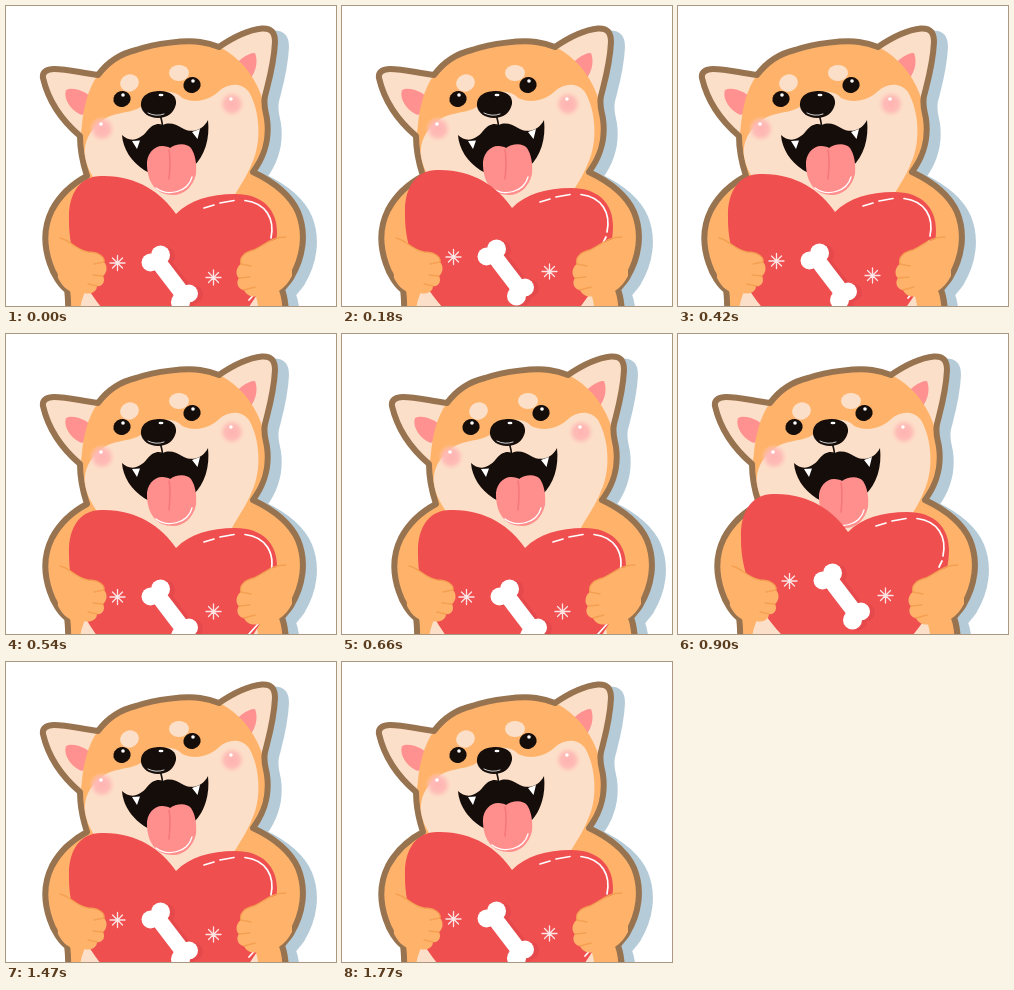
Animation, 330 px wide and 300 px high, one loop 1.8 s. Source, as an HTML page:

```html
<!DOCTYPE html>
<html lang="en">
<head>
<meta charset="utf-8">
<title>Puppy with a heart</title>
<style>
  html, body { margin: 0; width: 100%; height: 100%; overflow: hidden; background: #fff; }
  svg { display: block; width: 330px; height: 300px; }
  .ink { fill: #150d0a; }
  .cream { fill: #fcdfc8; }
  .pink { fill: #ff9290; }
  .fur { fill: #ffb36a; }
  .white { fill: #fff; }
  .line { fill: none; stroke-linecap: round; stroke-linejoin: round; }
  .crease { stroke: #f4a052; stroke-width: 1.3; }
</style>
</head>
<body>
<svg viewBox="0 0 330 300" xmlns="http://www.w3.org/2000/svg">
  <defs>
    <path id="silhouette" d="M37 72 C36 66 41 63 48 63 C62 63 75 67 92 69
      C104 53 117 47 130 44 C150 37 180 34 194 36 C202 37 208 39 213 41
      C226 32 242 24 256 22.5 C266 22 269 27 269 36 C268 58 263 74 259 90
      C257 100 260 106 261 113 C264 135 258 151 247 166
      C268 176 284 188 292 206 C301 228 297 252 285 272 C281 278 277 281 276 284
      C279 291 280 300 281 325 L62 325 C62 308 63 296 61 284
      C55 280 47 268 44 258 C37 238 38 220 46 204 C54 189 66 178 81 170
      C77 158 74 145 74 130 C60 118 43 98 37 72Z"/>
    <radialGradient id="blushFill">
      <stop offset="0" stop-color="#ffb3b2"/>
      <stop offset=".55" stop-color="#ffb8b5" stop-opacity=".9"/>
      <stop offset="1" stop-color="#ffc8bd" stop-opacity="0"/>
    </radialGradient>
    <g id="blush">
      <circle r="13" fill="url(#blushFill)"/>
      <circle class="white" cx="-1" cy="-5" r="1.8"/>
    </g>
    <g id="eye">
      <ellipse class="ink" rx="8.7" ry="8" transform="rotate(-15)"/>
      <circle class="white" cx="1" cy="-4" r="1.8"/>
    </g>
    <path id="flake" class="line" stroke="#fff" stroke-opacity=".85" stroke-width="1.3"
      d="M0 -7.5V7.5M-7.5 0H7.5M-5 -5L5 5M-5 5L5 -5"/>
    <g id="bone">
      <path d="M150 253 L179 291" stroke="currentColor" stroke-width="16"/>
      <g fill="currentColor">
        <circle cx="144.500" cy="256.500" r="9"/>
        <circle cx="154.500" cy="249" r="9.500"/>
        <circle cx="174.500" cy="296" r="9.500"/>
        <circle cx="183" cy="287.500" r="9"/>
      </g>
    </g>
  </defs>

  <g id="dog">
    <use href="#silhouette" x="11" y="5" fill="#b6cbd8" stroke="#b6cbd8" stroke-width="6"/>
    <use href="#silhouette" class="fur"/>

    <path class="cream" d="M37 72 C36 66 41 63 48 63 C62 63 75 67 92 69 L74 130 C60 118 43 98 37 72Z"/>
    <path class="cream" d="M213 41 C226 32 242 24 256 22.5 C266 22 269 27 269 36
      C268 58 263 74 259 90 L258 100Z"/>
    <path class="pink" d="M60 84 C68 80 82 86 92 97 L76 109 C65 105 57 93 60 84Z"/>
    <path class="pink" d="M222 66 C232 54 243 46 249 47 C253 57 249 69 240 78Z"/>
    <path class="fur" d="M92 69 C82 82 76 104 75 132 L261 113 C257 82 240 54 213 41 L130 44Z"/>
    <use href="#silhouette" fill="none" stroke="#977350" stroke-width="6" stroke-linejoin="round"/>

    <path class="cream" d="M79 150 C77 134 87 119 102 111 C116 105 130 107 138 98
      C147 84 168 82 176 92 C189 98 203 94 212 86 C222 77 235 76 243 86
      C254 105 256 136 246 157 C241 171 231 184 226 194 L222 215 L120 215
      C105 190 83 176 79 150Z"/>
    <path class="cream" d="M74 325 C72 306 75 292 82 280 H246 C252 292 254 306 252 325Z"/>

    <ellipse class="cream" cx="123.500" cy="77" rx="9.500" ry="8.500" transform="rotate(-20 123.500 77)"/>
    <ellipse class="cream" cx="173" cy="67" rx="10" ry="8"/>
    <use href="#eye" x="116" y="93"/>
    <use href="#eye" x="186" y="79"/>
    <use href="#blush" x="96" y="123"/>
    <use href="#blush" x="226" y="98"/>

    <path class="line" d="M154 108 Q156 115 157 122" stroke="#150d0a" stroke-width="1.6"/>
    <path class="ink" d="M135 100 C134 89 144 85 154 85 C164 85 171 90 170 98
      C168 107 161 112 152 112 C143 112 136 107 135 100Z"/>
    <ellipse class="white" cx="155" cy="89" rx="2.500" ry="1.300"/>
    <path class="line" d="M142 107 Q150 111 158 108" stroke="#fff" stroke-width=".8"/>

    <path class="ink" d="M116 129 C124 137 134 134 141 125 C147 118 152 117 157 119
      C163 116 170 118 176 122 C186 128 197 124 202 114 C204 132 199 150 187 161
      C174 171 150 172 138 164 C125 155 117 143 116 129Z"/>
    <path class="white" d="M126 135 L134 134.500 L131 143Z M186 126 L194 123 L191.500 133Z"/>

    <g id="tongue">
      <path d="M141 160 C140 148 148 140 156 140 C160 140 163 141 164 142
        C169 138 180 136 185 142 C189 148 191 157 190 168 C187 181 178 189 167 189
        C151 189 142 178 141 160Z" fill="#ff8f8d"/>
      <path class="line" d="M163 144 C165 153 164 163 163 173" stroke="#f4777a" stroke-width="1.500"/>
      <path class="line" d="M150 182 C162 191 182 186 186 171" stroke="#fff" stroke-width="1.300"/>
    </g>

    <g id="heart">
      <path d="M63 214 C62 188 74 170 95 170 C130 169 155 186 170 208
        C184 194 204 188 229 188 C257 188 271 204 271 226 C271 275 225 340 172 352
        C110 335 62 275 63 214Z" fill="#f04f50"/>
      <path class="line" d="M198 202 L208 199 M214 197 L228 194.500
        M239 194.500 C260 197 269 213 265 232 M264 237 L261 243 M252 284 L243 294"
        stroke="#fff" stroke-width="1.700"/>
      <use href="#flake" x="111.500" y="257"/>
      <use href="#flake" x="207.500" y="271.500"/>
      <use href="#bone" x="5" y="1" color="#e5494b"/>
      <use href="#bone" color="#fff"/>
    </g>

    <path class="fur" d="M50 231 C63 232 69 243 82 246 C91 246 99 250 98 256
      C102 260 101 267 97 270 C100 276 96 281 91 280 C91 286 84 289 78 287
      C67 289 58 284 52 272Z"/>
    <path class="line crease" d="M54 232 C64 234 70 244 82 246 C91 246 99 250 98 256
      M88 258 L98 256 M87 269 L97 270 M82 278 L91 280"/>
    <path class="fur" d="M286 232 C267 230 259 239 248 244 C239 246 233 251 235 258
      C230 261 229 269 233 272 C229 277 233 284 238 284 C241 291 249 292 256 289
      C267 290 279 284 286 270Z"/>
    <path class="line crease" d="M280 231 C265 231 259 239 248 244 C239 246 233 251 235 258
      M245 260 L235 258 M244 271 L233 272 M249 281 L238 284"/>
  </g>
</svg>
<script>
  const LOOP = 1800, STEP = 30;
  const part = id => document.getElementById(id);
  const dog = part('dog'), heart = part('heart'), tongue = part('tongue');

  // Linear interpolation through values spaced evenly in time; holds the last one.
  function track(t, spacing, values) {
    const i = Math.floor(t / spacing);
    if (i >= values.length - 1) return values[values.length - 1];
    return values[i] + (values[i + 1] - values[i]) * (t / spacing - i);
  }

  const move = (node, x, y) =>
    node.setAttribute('transform', `translate(${Math.round(x)} ${Math.round(y)})`);

  function draw(t) {
    move(dog, track(t, 90, [0, -20, 0, 20, 0, -20, 0, 20, 0]), 0);
    move(heart, 0, track(t, 300, [0, -10, 10, -10, 10, 0]));
    move(tongue, 0, 2.5 * (1 - Math.cos(t / 200 * 2 * Math.PI)));
  }

  const start = performance.now();
  function tick() {
    const t = (performance.now() - start) % LOOP;
    draw(Math.floor(t / STEP) * STEP);
    requestAnimationFrame(tick);
  }
  tick();
</script>
</body>
</html>
```
